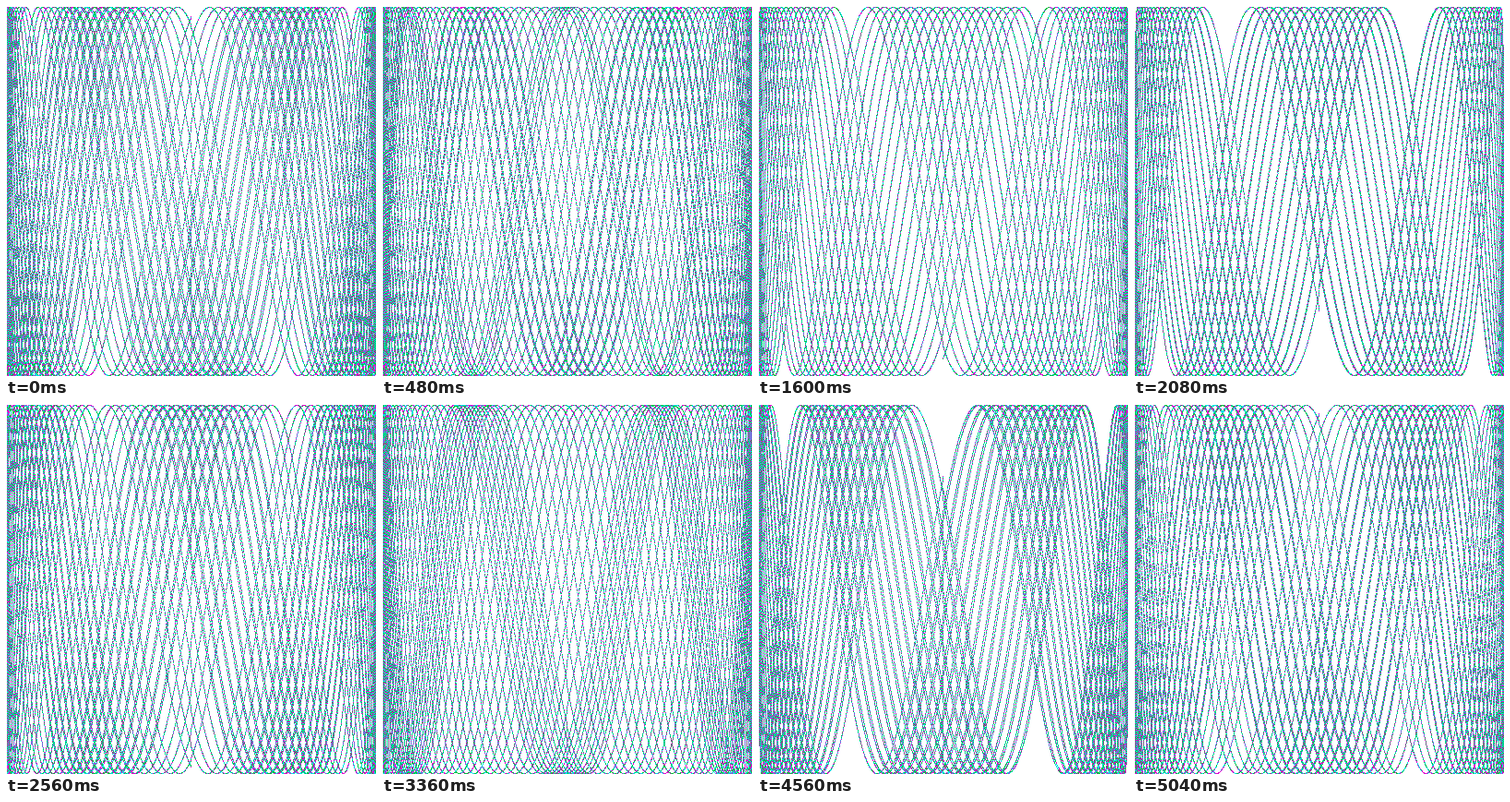
An HTML page with a canvas for the animation above (5.12 s loop, 401x401 px).

```html
<!DOCTYPE html>
<html lang="en">
<head>
<meta charset="utf-8">
<title>Lissajous</title>
<style>
html, body { margin: 0; width: 100%; height: 100%; overflow: hidden; background: #fff; }
canvas { display: block; width: 401px; height: 401px; }
</style>
</head>
<body>
<canvas id="stage" width="401" height="401"></canvas>
<script>
const R = 200, SIZE = 2 * R + 1;
const CYCLES = 15, STEP = 0.001, FREQ = 6.046602879796196;
const FRAMES = 64, DELAY = 80, PHASE_STEP = 0.1;
const rgb = (r, g, b) => (255 << 24 | b << 16 | g << 8 | r) >>> 0;
const WHITE = rgb(255, 255, 255);
const INKS = [rgb(0, 192, 64), rgb(0, 224, 224), rgb(224, 0, 208)];

const ctx = document.getElementById("stage").getContext("2d");
const image = ctx.createImageData(SIZE, SIZE);
const pixels = new Uint32Array(image.data.buffer);
const toPixel = v => R + Math.trunc(v * R + 0.5);

function draw(phase) {
  pixels.fill(WHITE);
  const end = CYCLES * 2 * Math.PI;
  for (let i = 0, t = 0; t < end; i++, t += STEP) {
    const x = toPixel(Math.sin(t));
    const y = toPixel(Math.sin(t * FREQ + phase));
    pixels[y * SIZE + x] = INKS[i % INKS.length];
  }
  ctx.putImageData(image, 0, 0);
}

let shown = -1;
function tick() {
  const n = Math.floor(performance.now() / DELAY) % FRAMES;
  if (n !== shown) draw((shown = n) * PHASE_STEP);
  requestAnimationFrame(tick);
}
tick();
</script>
</body>
</html>
```
